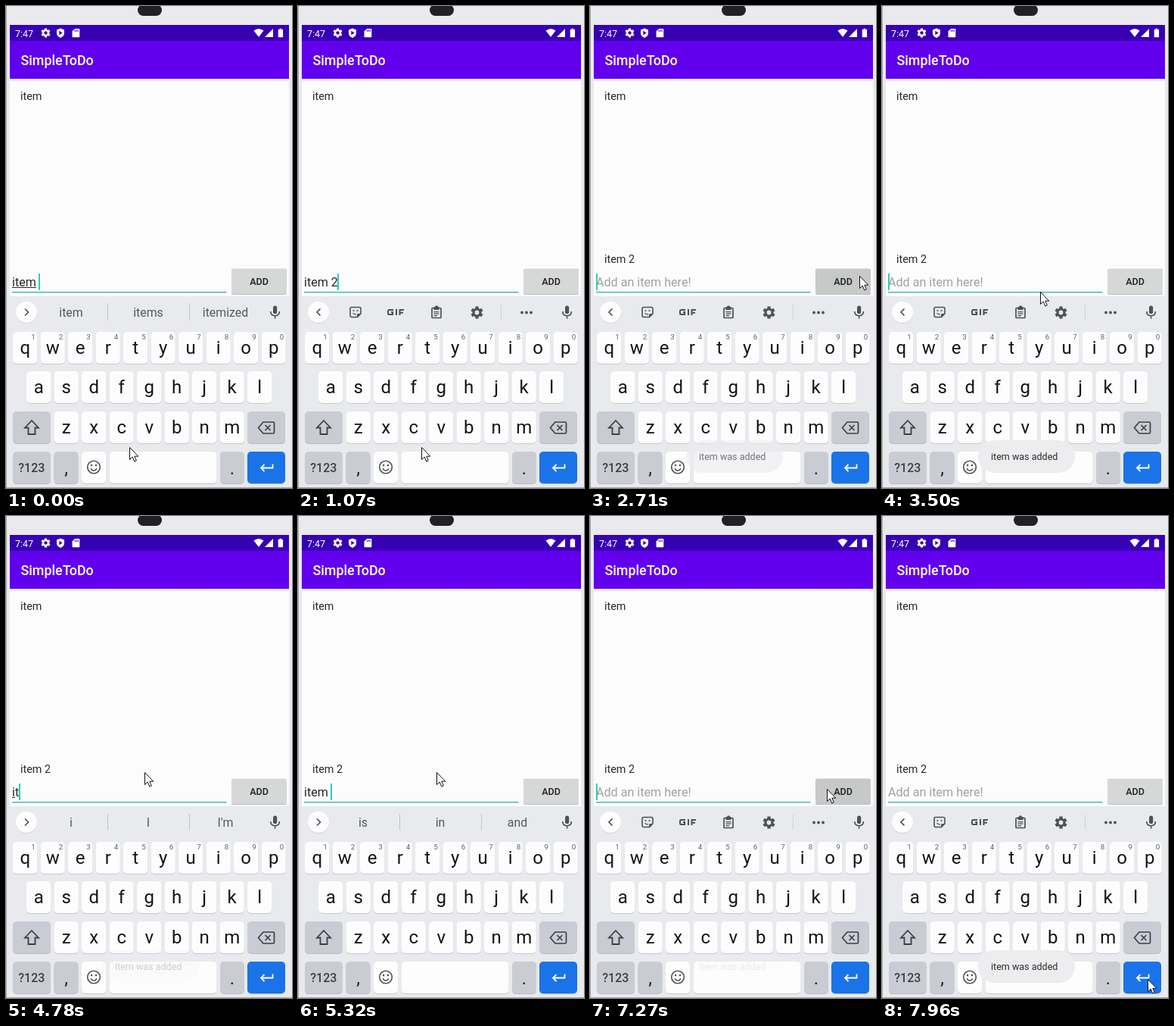
An HTML page with a canvas for the animation above (8000 ms loop, 378x636 px).

```html
<!DOCTYPE html>
<html lang="en">
<head>
<meta charset="utf-8">
<title>To-do list</title>
<style>
html, body { margin: 0; width: 100%; height: 100%; overflow: hidden; background: #e8eaed; }
canvas { display: block; width: 378px; height: 636px; }
</style>
</head>
<body>
<canvas id="stage" width="378" height="636"></canvas>
<script>
const g = document.getElementById('stage').getContext('2d');
const LOOP = 8000;
const FONT = 'Roboto, sans-serif';
const INK = '#272727', ICON = '#4d5156', BOARD = '#e8eaed', KEY = '#fdfdfe', DARK_KEY = '#c9cdd3';
const DP = 0.896; // stage pixels per Android unit
const FIELD = 18 * DP;

// Text entry: one word typed at a steady pace, digits and clears in between.
const WORD = 'item ', TYPING = 4510, KEY_TIME = 165;
const ADDS = [2430, 7200];
const edits = [
  { at: -LOOP, text: 'item' },
  { at: 0, text: WORD },
  { at: 270, text: WORD },
  { at: 700, text: 'item 2' },
  { at: ADDS[0], text: '' },
  ...[...WORD].map((_, i) => ({ at: TYPING + i * KEY_TIME, text: WORD.slice(0, i + 1) })),
  { at: 5750, text: 'item 3' },
  { at: ADDS[1], text: '' }
];

const suggestions = {
  'i': ['i', 'I', "I'm"],
  'it': ['it', 'its', "it's"],
  'ite': ['item', 'items', 'itemized'],
  'item': ['item', 'items', 'itemized'],
  'item ': ['is', 'in', 'and']
};

// Pointer moves; it rests between them.
const START = { x: 163, y: 582 };
const moves = [
  { from: 1220, to: 1920, x: 356, y: 356 },
  { from: 2730, to: 3250, x: 209, y: 377 },
  { from: 3850, to: 4230, x: 183, y: 338 },
  { from: 5950, to: 6610, x: 271, y: 347 },
  { from: 6700, to: 6880, x: 313, y: 360 },
  { from: 7300, to: 7540, x: 303, y: 496 },
  { from: 7700, to: 7960, x: 351, y: 611 }
];

const clamp = v => Math.min(1, Math.max(0, v));
const smooth = u => u * u * (3 - 2 * u);
const lastEdit = t => edits.findLast(e => e.at <= t);
const textAt = t => lastEdit(t).text;
const hasDigit = s => /\d/.test(s);

// The keyboard reacts a little after each key, and more slowly to digits.
function seenAt(t) {
  const seen = textAt(t - 150);
  return hasDigit(seen) ? textAt(t - 320) : seen;
}

const caretOn = t => Math.floor((t - lastEdit(t).at) / 500) % 2 === 0;
const pressed = t => ADDS.some(add => t > add - 100 && t < add + 350);

function toastAlpha(t) {
  const fade = age => clamp(Math.min((age - 40) / 380, 1 - (age - 2000) / 450));
  return Math.max(...ADDS.map(add => fade(t - add)));
}

function pointerAt(t) {
  let { x, y } = START;
  for (const m of moves) {
    const u = smooth(clamp((t - m.from) / (m.to - m.from)));
    x += (m.x - x) * u;
    y += (m.y - y) * u;
  }
  return [Math.round(x), Math.round(y)];
}

function rect(x, y, w, h, color) {
  g.fillStyle = color;
  g.fillRect(x, y, w, h);
}

function round(x, y, w, h, r, color) {
  g.fillStyle = color;
  g.beginPath();
  g.roundRect(x, y, w, h, r);
  g.fill();
}

function disc(x, y, r, color) {
  g.fillStyle = color;
  g.beginPath();
  g.arc(x, y, r, 0, Math.PI * 2);
  g.fill();
}

function fill(path, color) {
  g.fillStyle = color;
  g.fill(new Path2D(path));
}

function line(path, color, width) {
  g.strokeStyle = color;
  g.lineWidth = width;
  g.stroke(new Path2D(path));
}

function label(text, x, y, size, color, align = 'left', weight = 400) {
  g.font = `${weight} ${size}px ${FONT}`;
  g.textAlign = align;
  g.fillStyle = color;
  g.fillText(text, x, y);
}

function fieldWidth(text) {
  g.font = `400 ${FIELD}px ${FONT}`;
  return g.measureText(text).width;
}

function gear(x, y, r, color, hole) {
  g.save();
  g.translate(x, y);
  for (let i = 0; i < 6; i++) {
    rect(-r * 0.27, -r, r * 0.54, r * 0.6, color);
    g.rotate(Math.PI / 3);
  }
  disc(0, 0, r * 0.75, color);
  disc(0, 0, r * 0.36, hole);
  g.restore();
}

function statusBar() {
  const bar = '#3700b3', on = '#fff';
  rect(5, 25, 369, 21, bar);
  label('7:47', 12, 40.5, 14 * DP, on);
  gear(52.5, 35.5, 6, on, bar);
  fill('M72 29.5l5 2v4q0 4.5-5 6.5q-5-2-5-6.5v-4z', on);
  fill('M70.3 32.8v5.4l4.4-2.7z', bar);
  fill('M91 30h5.5q.8 0 .8.8v9.6q0 .8-.8.8h-8.2q-.8 0-.8-.8v-6.9z', on);
  for (let x = 90.7; x < 96; x += 2) rect(x, 31.5, 1, 2.4, bar);
  fill('M327.5 32.5q6.5-5 13 0l-6.5 8.5z', on);
  fill('M353 30v11h-11z', on);
  fill('M361.5 29.8h2.6v1.2h2v10.3h-6.4v-10.3h1.8z', on);
}

function frame() {
  rect(0, 0, 378, 636, '#e9eaee');
  round(174, -2, 32, 15, 7.5, '#202124');
  rect(5, 96, 369, 287, '#fcfcfc');
  const shade = g.createLinearGradient(0, 96, 0, 100);
  shade.addColorStop(0, '#dcdce0');
  shade.addColorStop(1, '#fcfcfc');
  rect(5, 96, 369, 4, shade);
  statusBar();
  rect(5, 46, 369, 50, '#6200ee');
  label('SimpleToDo', 19.4, 78, 20 * DP, '#fff', 'left', 500);
}

function form(t) {
  const text = textAt(t), seen = seenAt(t);
  label('item', 19, 124, 16 * DP, INK);
  if (t >= ADDS[0]) label('item 2', 19, 339, 16 * DP, INK);
  if (text) label(text, 8, 370, FIELD, INK);
  else label('Add an item here!', 8, 370, FIELD, '#a1a1a1');

  const composing = text && seen && !hasDigit(seen) && !seen.endsWith(' ');
  if (composing) rect(8, 371, fieldWidth(seen), 1, INK);
  rect(8, 377, 283.5, 1.4, '#35b9aa');
  if (caretOn(t)) rect(Math.floor(8 + fieldWidth(text)), 353, 2, 22, '#2bcdbb');

  round(298, 347.5, 73, 33.5, 2, '#bdbebe');
  round(298, 346.5, 73, 33.5, 2, pressed(t) ? '#c7c8c8' : '#d6d7d7');
  label('ADD', 334.5, 368, 14 * DP, '#1f1f1f', 'center', 500);
}

function tools() {
  line('M81 397.5h-10q-2 0-2 2v9q0 2 2 2h7.500l4.500-4.500v-6.500q0-2-2-2z', ICON, 1.6);
  fill('M78 411v-3.500q0-1.500 1.500-1.500h3.500z', ICON);
  disc(73.5, 402, 1.1, ICON);
  disc(78.5, 402, 1.1, ICON);
  line('M72.5 405q1.500 2.300 4.500 1.800', ICON, 1.3);
  line('M126 401h-5.500q-1.500 0-1.500 1.500v3q0 1.500 1.500 1.500h4.500v-3h-2M130 400v8M134.500 408v-7h5.500M134.500 404.700h4.500', ICON, 2);
  line('M178 398.500h10q1 0 1 1v11q0 1-1 1h-10q-1 0-1-1v-11q0-1 1-1z', ICON, 1.7);
  round(179.5, 397, 7, 4, 0.5, ICON);
  disc(183, 397.3, 2, ICON);
  line('M179.500 403.700h7M179.500 406.200h7M179.500 408.700h4.500', ICON, 1.3);
  gear(236.5, 404.5, 8, ICON, BOARD);
  rect(268, 394, 1, 20, '#cfd1d5');
  for (let i = 0; i < 3; i++) disc(296 + i * 6, 404.5, 1.9, ICON);
}

function strip(words) {
  disc(27, 405, 14, '#d2d4d8');
  disc(27, 404, 14, KEY);
  if (words) {
    line('M25 399.500l4.500 4.500-4.500 4.500', ICON, 1.7);
    words.forEach((word, i) => label(word, 86 + i * 102, 410, 15.9, '#55595e', 'center'));
    for (const x of [134, 242]) rect(x, 393, 1, 22, '#c1c4c8');
  } else {
    line('M29.500 399.500l-4.500 4.500 4.500 4.500', ICON, 1.7);
    tools();
  }
  round(353, 395.5, 5.2, 10.5, 2.6, ICON);
  line('M349.800 403q0 5.700 5.800 5.700t5.800-5.700M355.600 408.500v4', ICON, 1.6);
}

function key(x, y, w, color) {
  round(x, y + 1, w, 42, 5, color === KEY ? '#c6c8cc' : '#b9bdc3');
  round(x, y, w, 42, 5, color);
}

function letters(row, x, y, numbered) {
  [...row].forEach((ch, i) => {
    const left = x + i * 36.5;
    key(left, y, 32.3, KEY);
    label(ch, left + 16.2, y + 28.5, 24, '#141414', 'center');
    if (numbered) label((i + 1) % 10, left + 27, y + 10.3, 9.8, '#5f6368', 'center');
  });
}

function keyboard(t) {
  rect(1, 383, 377, 253, BOARD);
  strip(suggestions[seenAt(t)]);
  letters('qwertyuiop', 9, 430, true);
  letters('asdfghjkl', 27, 482);
  letters('zxcvbnm', 63.5, 535);

  key(9, 535, 50, DARK_KEY);
  line('M34 547l9 9.500h-4.500v8.500h-9v-8.500h-4.500z', '#3c4043', 1.8);
  key(319, 535, 50, DARK_KEY);
  line('M340 549h13q1.500 0 1.500 1.500v12q0 1.500-1.500 1.500h-13l-6.500-7.500zM342.500 553l7 7M349.500 553l-7 7', '#3c4043', 1.7);

  key(9, 588, 50, DARK_KEY);
  label('?123', 33.8, 615, 16, '#3c4043', 'center', 500);
  key(63.5, 588, 32, DARK_KEY);
  label(',', 79.5, 618, 24, '#202124', 'center');
  key(100, 588, 32, KEY);
  line('M124.300 608.500a8.300 8.300 0 1 1-16.600 0a8.300 8.300 0 1 1 16.600 0zM112 610.500q4 5.500 8 0', ICON, 1.6);
  disc(113.1, 606, 1.3, ICON);
  disc(118.9, 606, 1.3, ICON);
  key(136.5, 588, 142, KEY);
  key(283, 588, 32, DARK_KEY);
  label('.', 299, 618, 24, '#202124', 'center');
  key(319, 588, 50, '#1a73e8');
  line('M352.500 604.500v5h-15.500M341.500 605l-4.500 4.500 4.500 4.500', '#fff', 1.8);
}

function toast(alpha) {
  g.globalAlpha = alpha;
  round(127, 573, 128, 43, 21.5, '#ededef');
  label('item was added', 144, 599, 14 * DP, '#2c2c2c');
  g.globalAlpha = 1;
}

function edges() {
  rect(0, 0, 1, 636, '#a5a6aa');
  rect(0, 635, 378, 1, '#a5a6aa');
}

function pointer([x, y]) {
  g.save();
  g.translate(x + 0.5, y + 0.5);
  const arrow = 'M0 0v16l3.700-3.500 2.600 6 2.500-1.100-2.500-5.700h5z';
  fill(arrow, '#fff');
  line(arrow, '#111', 1);
  g.restore();
}

function draw() {
  const t = performance.now() % LOOP;
  frame();
  form(t);
  keyboard(t);
  toast(toastAlpha(t));
  edges();
  pointer(pointerAt(t));
  requestAnimationFrame(draw);
}

draw();
</script>
</body>
</html>
```
